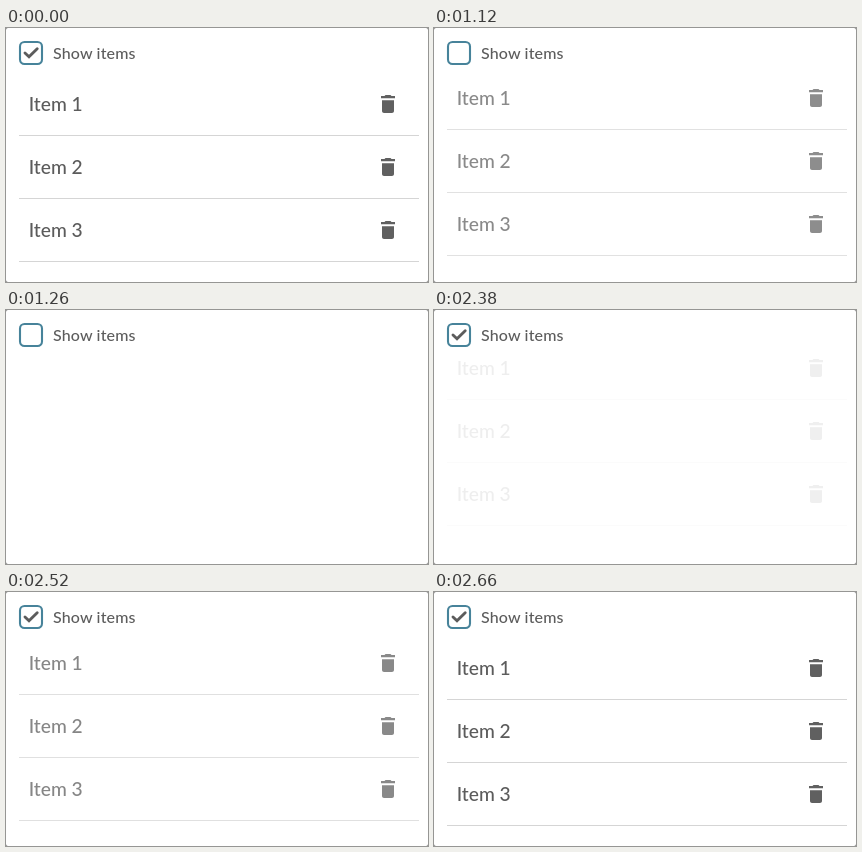
Recreate the animation shown at these times as an HTML page. Size 422 by 254 pixels, loop 3.36 s.

```html
<!DOCTYPE html>
<html lang="en">
<head>
<meta charset="utf-8">
<title>Show items</title>
<style>
  html, body { margin: 0; width: 100%; height: 100%; overflow: hidden; background: #777; }
  svg { display: block; width: 422px; height: 254px; }
  text { font-family: Lato, "Open Sans", sans-serif; font-weight: 500; fill: #5c5c5c; }
  .label { font-size: 16px; letter-spacing: 0.17px; }
  .item { font-size: 19.2px; }
</style>
</head>
<body>
<svg viewBox="0 0 422 254">
  <rect width="422" height="254" rx="2" fill="#fff"/>
  <rect x="14" y="14" width="22" height="22" rx="4.5" fill="#fff" stroke="#47839a" stroke-width="2.1"/>
  <path id="check" d="M19 25l4 3.7 8.2-8" fill="none" stroke="#5c5c5c" stroke-width="2.9" stroke-linecap="round"/>
  <text class="label" x="46.9" y="31">Show items</text>
  <g id="list"></g>
</svg>
<script>
  const LOOP = 3360;
  const TICK = 70;
  const ROW = 63;
  const SLIDE = 20;
  const HIDE = { at: 1050, span: 200 };
  const SHOW = { at: 2320, span: 300 };
  const TRASH = 'M6 19c0 1.1.9 2 2 2h8c1.1 0 2-.9 2-2V8.3H6zM19 4h-3.5l-1-1h-5l-1 1H5v2.3h14z';

  const list = document.getElementById('list');
  const check = document.getElementById('check');

  list.innerHTML = [1, 2, 3].map((n, i) => `
    <g transform="translate(0 ${i * ROW})">
      <text class="item" x="22.7" y="83">Item ${n}</text>
      <path d="${TRASH}" transform="translate(370 64)" fill="#606060"/>
      <rect x="13" y="107" width="400" height="1" fill="#d5d5d5"/>
    </g>`).join('');

  // Eased progress of a phase, from 0 to 1
  function ease(t, { at, span }) {
    const u = Math.min(1, Math.max(0, (t - at) / span));
    return u * u * (3 - 2 * u);
  }

  function listPose(t) {
    const p = 1 - ease(t, HIDE) + ease(t, SHOW);
    return { transform: `translateY(${Math.round((p - 1) * SLIDE)}px)`, opacity: p };
  }

  function checkPose(t) {
    return { opacity: t > HIDE.at && t < SHOW.at ? 0 : 1 };
  }

  // Each pose holds for one tick
  function play(el, pose) {
    const frames = [];
    for (let t = 0; t <= LOOP; t += TICK) {
      frames.push({ offset: t / LOOP, easing: 'step-end', ...pose(t) });
    }
    el.animate(frames, { duration: LOOP, iterations: Infinity });
  }

  play(list, listPose);
  play(check, checkPose);
</script>
</body>
</html>
```
